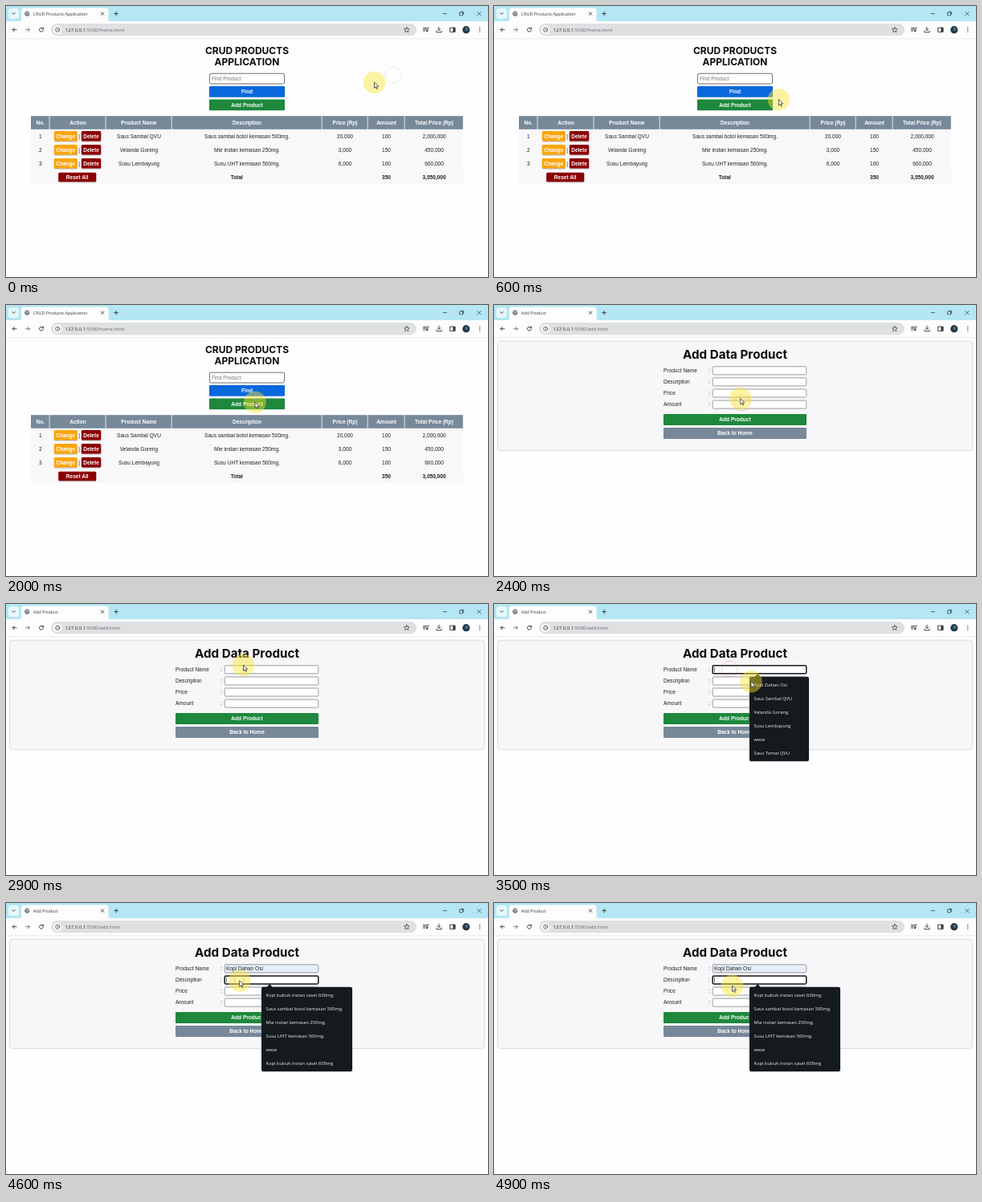
Animation, 600 px wide and 338 px high, one loop 5000 ms. Source, as an HTML page:

```html
<!DOCTYPE html>
<html lang="en">
<head>
<meta charset="utf-8">
<title>CRUD Products Application</title>
<style>
  html, body { margin: 0; width: 100%; height: 100%; overflow: hidden; background: #fefdff; }
  svg { display: block; width: 100%; height: 100%; }
  text { font: 6.55px "Liberation Sans", Arial, sans-serif; fill: #222; white-space: pre; }
  .bold { font-weight: 700; }
  .white { fill: #fff; }
  .hint { font-size: 6.4px; fill: #777; }
  .title { font: 700 12px Inter, sans-serif; fill: #0c0c0c; }
  .big { font-size: 15.2px; }
  .ui { font: 5.4px "Open Sans", sans-serif; fill: #33383c; }
  .url { font-size: 6px; fill: #62666a; }
  .item { font-size: 5.75px; fill: #eceef0; }
  .icon { fill: none; stroke: #33373a; stroke-width: .9; stroke-linecap: round; stroke-linejoin: round; }
</style>
</head>
<body>
<svg id="stage" viewBox="0 0 600 338" preserveAspectRatio="none"></svg>
<script>
const NS = "http://www.w3.org/2000/svg";
const stage = document.getElementById("stage");
const LOOP = 5000, STEP = 100;
const GREEN = "#1e883c", SLATE = "#778899", ORANGE = "#fca50c", RED = "#8b0000";

function add(parent, tag, attrs = {}, content) {
  const el = document.createElementNS(NS, tag);
  for (const key in attrs) el.setAttribute(key, attrs[key]);
  if (content !== undefined) el.textContent = content;
  parent.appendChild(el);
  return el;
}
const set = (el, attrs) => { for (const key in attrs) el.setAttribute(key, attrs[key]); };
const show = (el, on) => el.setAttribute("visibility", on ? "visible" : "hidden");
const group = parent => add(parent, "g");
const rect = (p, x, y, width, height, fill, more = {}) =>
  add(p, "rect", { x, y, width, height, fill, ...more });
const circle = (p, cx, cy, r, fill, more = {}) => add(p, "circle", { cx, cy, r, fill, ...more });
const icon = (p, d, more = {}) => add(p, "path", { d, class: "icon", ...more });
const label = (p, x, y, str, cls = "") => add(p, "text", { x, y, class: cls }, str);
const centred = (p, x, y, str, cls = "") =>
  add(p, "text", { x, y, class: cls, "text-anchor": "middle" }, str);

function button(p, x, y, w, h, fill, str, raised) {
  if (raised) rect(p, x + .3, y + 1, w, h, "#000", { rx: 1.5, opacity: .25 });
  rect(p, x, y, w, h, fill, { rx: raised ? 1.5 : 1 });
  centred(p, x + w / 2, y + h / 2 + 2.3, str, "bold white");
}

function buildBrowser(p) {
  rect(p, 0, 0, 600, 20, "#b4e7f3");
  rect(p, 0, 19, 600, 22, "#fdfdfe");
  rect(p, 0, 40.5, 600, .7, "#dfe2e5");
  rect(p, 3, 3, 13, 13, "#e6f7fb", { rx: 3.5 });
  icon(p, "M7.8 8.6 L9.6 10.4 L11.4 8.6");
  add(p, "path", { d: "M15 19.5 Q19 19.5 19 16 V6 Q19 2.5 22.5 2.5 H124 Q127.500 2.500 127.500 6 V16 Q127.500 19.500 131 19.500 Z", fill: "#fdfdfe" });
  circle(p, 26.3, 9.6, 3.1, "#6b7075");
  add(p, "path", { d: "M24 8.500 Q26 7 26.500 9 T25.500 11.500 M27.500 7.500 L28.500 10", class: "icon", style: "stroke:#e9ecee;stroke-width:.8" });
  icon(p, "M118.4 7.900 l3.400 3.400 m0 -3.400 l-3.400 3.400");
  icon(p, "M134.700 9.600 h4.800 M137.100 7.200 v4.800");
  icon(p, "M544 9.600 h4.600", { style: "stroke-width:.7" });
  icon(p, "M565 8.200 h3.600 v3.600 h-3.600 z M566.200 7.200 h3.400 v3.400", { style: "stroke-width:.7" });
  icon(p, "M586.800 7.400 l4.400 4.400 m0 -4.400 l-4.400 4.400", { style: "stroke-width:.7" });

  icon(p, "M13 29.600 H8.200 M10.400 27.300 L8.100 29.600 L10.400 31.900");
  icon(p, "M24.600 29.600 H29.400 M27.200 27.300 L29.500 29.600 L27.200 31.900", { opacity: .65 });
  icon(p, "M46 28.100 A2.500 2.500 0 1 0 46.500 30.200 M46.600 26.900 V28.700 H44.800");
  rect(p, 56, 22, 455, 15.3, "#dfe0e2", { rx: 7.6 });
  circle(p, 64.2, 29.7, 5.4, "#f8f9fa");
  circle(p, 64.2, 29.7, 2.6, "none", { class: "icon", style: "stroke-width:.7" });
  icon(p, "M64.200 29.500 v1.200 M64.200 28.200 v.1", { style: "stroke-width:.7" });
  const star = Array.from({ length: 10 }, (_, i) => {
    const a = -Math.PI / 2 + i * Math.PI / 5, r = i % 2 ? 1.6 : 3.5;
    return (498.8 + r * Math.cos(a)).toFixed(2) + "," + (29.8 + r * Math.sin(a)).toFixed(2);
  });
  add(p, "polygon", { points: star.join(" "), class: "icon", style: "stroke-width:.7" });
  icon(p, "M519.500 27.500 h4 M519.500 29.300 h4 M519.500 31.100 h2 M524.900 31 V27 h1.300");
  circle(p, 524.1, 31.2, 1.1, "#33373a");
  icon(p, "M539 26.200 v4 M537.200 28.600 L539 30.400 L540.800 28.600 M535.900 31 v1.800 h6.200 v-1.800");
  icon(p, "M553 27 h6 v5.400 h-6 z");
  rect(p, 556.4, 27, 2.8, 5.4, "#33373a");
  circle(p, 572.8, 29.7, 4.6, "#243746");
  circle(p, 573.3, 29, 2, "#47758a");
  for (const y of [27.3, 29.7, 32.1]) circle(p, 589.8, y, .7, "#33373a");

  const tab = label(p, 33.8, 11.6, "", "ui");
  const url = add(p, "text", { x: 73.8, y: 31.8, class: "ui url" });
  add(url, "tspan", { style: "fill:#26292c" }, "127.0.0.1");
  const path = add(url, "tspan", {}, "");
  return { tab, path };
}

function buildHome(p) {
  centred(p, 300, 60.4, "CRUD PRODUCTS", "title");
  centred(p, 300, 74.4, "APPLICATION", "title");
  rect(p, 253.4, 84.2, 93.2, 12.8, "#fff", { rx: 1.8, stroke: "#4b4b50", "stroke-width": .8 });
  label(p, 256, 92.8, "Find Product", "hint");
  button(p, 253, 100, 94, 13.8, "#0868dc", "Find");
  button(p, 253, 116.4, 94, 13.8, GREEN, "Add Product");

  const edges = [31, 54.5, 124.5, 206.5, 393.5, 450.5, 496.5, 569.6];
  const heads = ["No.", "Action", "Product Name", "Description", "Price (Rp)", "Amount", "Total Price (Rp)"];
  const mid = i => (edges[i] + edges[i + 1]) / 2;
  heads.forEach((str, i) => {
    rect(p, edges[i], 137.2, edges[i + 1] - edges[i] - .8, 16.6, SLATE);
    centred(p, mid(i), 147.8, str, "bold white");
  });
  const rows = [
    ["Saus Sambal QVU", "Saus sambal botol kemasan 500mg.", "20,000", "100", "2,000,000"],
    ["Velanda Goreng", "Mie instan kemasan 250mg.", "3,000", "150", "450,000"],
    ["Susu Lembayung", "Susu UHT kemasan 500mg.", "6,000", "100", "600,000"]
  ];
  rows.forEach((row, n) => {
    const y = 154.5 + n * 17;
    for (let i = 0; i < 7; i++) rect(p, edges[i], y, edges[i + 1] - edges[i] - .8, 16.3, "#f8f7f9");
    centred(p, mid(0), y + 10.2, n + 1);
    button(p, 59.8, y + 1.6, 28.8, 12.4, ORANGE, "Change", true);
    centred(p, 91.2, y + 10.2, "|");
    button(p, 93.8, y + 1.6, 24.4, 12.4, RED, "Delete", true);
    row.forEach((str, i) => centred(p, mid(i + 2), y + 10.2, str));
  });
  rect(p, 31, 205.5, 538.8, 16.3, "#f8f7f9");
  button(p, 65.2, 207.8, 47, 11.4, RED, "Reset All", true);
  [[287.3, "Total"], [473.5, "350"], [533, "3,050,000"]]
    .forEach(([x, str]) => centred(p, x, 215.7, str, "bold"));
}

function buildForm(p) {
  rect(p, 4.3, 45.2, 591.4, 136.4, "#f7f6f9", { rx: 4, stroke: "#d3d2d7", "stroke-width": .8 });
  centred(p, 300, 67.2, "Add Data Product", "title big");
  const fields = ["Product Name", "Description", "Price", "Amount"].map((str, i) => {
    const y = 76.8 + i * 14.1;
    label(p, 211, y + 7.3, str);
    label(p, 267, y + 7.3, ":");
    return rect(p, 272.2, y, 116.6, 10, "#fff", { rx: 1.4 });
  });
  button(p, 211, 135.9, 178, 14, GREEN, "Add Product");
  button(p, 211, 153, 178, 14, SLATE, "Back to Home");
  const value = label(p, 274, 84.1, COFFEE);
  const caret = rect(p, 274, 78.4, .6, 7, "#111");
  return { fields, value, caret };
}

function buildMenu(p, y, w, items) {
  const g = group(p);
  rect(g, 317.8, y + .8, w + .6, 105.6, "#000", { rx: 2.5, opacity: .16 });
  add(g, "path", { d: `M324.500 ${y + .2} L328.200 ${y - 3.800} L331.900 ${y + .2} Z`, fill: "#141a1d" });
  rect(g, 318, y, w, 105.2, "#141a1d", { rx: 2 });
  items.forEach((str, i) => label(g, 323.6, y + 12.3 + i * 16.9, str, "ui item"));
  return g;
}

const COFFEE = "Kopi Dahan Osi";
rect(stage, 0, 0, 600, 338, "#fefdff");
const home = group(stage), formPage = group(stage);
const bar = buildBrowser(stage);
buildHome(home);
const form = buildForm(formPage);
const nameMenu = buildMenu(stage, 90.8, 74, [COFFEE, "Saus Sambal QVU",
  "Velanda Goreng", "Susu Lembayung", "www", "Saus Tomat QVU"]);
const infoMenu = buildMenu(stage, 104.8, 113, ["Kopi bubuk instan saset 600mg.",
  "Saus sambal botol kemasan 500mg.", "Mie instan kemasan 250mg.",
  "Susu UHT kemasan 500mg.", "www", "Kopi bubuk instan saset 600mg"]);

// Clicks: time, x, y
const clicks = [[-300, 482, 86], [2100, 309, 122], [3200, 293.5, 81], [3900, 345, 102], [4500, 290, 96]]
  .map(([at, x, y]) => ({ at, ring: circle(stage, x, y, 5, "none", { "stroke-width": .9 }) }));
const pointer = group(stage);
circle(pointer, 0, .3, 13.8, "#f9e62e", { opacity: .45 });
add(pointer, "path", {
  d: "M0 0 V7.400 L1.700 5.900 L2.900 8.500 L4.100 8 L2.900 5.400 H5.200 Z",
  fill: "#fff", stroke: "#222", "stroke-width": .7, "stroke-linejoin": "round"
});

// Pointer path: time, x, y
const route = [
  [0, 458.5, 95], [900, 318, 124], [1200, 313, 123], [1400, 328, 129], [1700, 292, 123],
  [2000, 310, 121], [2300, 308, 121], [2800, 296, 77], [2900, 295.5, 76], [3100, 293.5, 81],
  [3250, 293.5, 81], [3500, 320, 96.500], [3800, 345, 102], [3950, 345, 102], [4200, 298.5, 103],
  [4400, 290, 96], [4550, 290, 96], [4800, 296.5, 103], [5000, 296.5, 103]
];
function pointerAt(t) {
  const i = Math.max(1, route.findIndex(stop => stop[0] >= t));
  const [t0, x0, y0] = route[i - 1], [t1, x1, y1] = route[i];
  const u = (t - t0) / (t1 - t0), k = u * u * (3 - 2 * u);
  return [x0 + (x1 - x0) * k, y0 + (y1 - y0) * k];
}

function draw(t) {
  const onForm = t >= 2300;
  show(home, !onForm);
  show(formPage, onForm);
  bar.tab.textContent = onForm ? "Add Product" : "CRUD Products Application";
  bar.path.textContent = onForm ? ":5500/add.html" : ":5500/home.html";

  const focus = t < 3200 ? -1 : t < 4500 ? 0 : 1;
  const filled = onForm && t >= 3800;
  form.fields.forEach((field, i) => set(field, {
    fill: i === 0 && filled ? "#e6eefa" : "#fff",
    stroke: i === focus ? "#15171a" : "#85858a",
    "stroke-width": i === focus ? 1.5 : .8
  }));
  show(form.value, filled);
  show(form.caret, focus >= 0);
  const atEnd = focus === 0 && filled;
  set(form.caret, {
    x: atEnd ? 274.3 + form.value.getComputedTextLength() : 274,
    y: focus === 1 ? 92.4 : 78.4
  });

  show(nameMenu, t >= 3300 && t < 4300);
  const closing = t >= 4200;
  set(nameMenu, {
    opacity: closing ? .5 : 1,
    transform: closing ? "translate(355 143.500) scale(.965) translate(-355 -143.500)" : ""
  });
  show(infoMenu, t >= 4600);

  for (const { at, ring } of clicks) {
    const age = (t - at) / 600;
    show(ring, age >= 0 && age < 1);
    set(ring, {
      r: 4 + 12 * Math.max(0, age),
      stroke: at < 0 ? "#bbb" : "#d9534f",
      opacity: Math.max(0, .6 * (1 - age))
    });
  }
  pointer.setAttribute("transform", `translate(${pointerAt(t).join(" ")})`);
}

const start = performance.now();
function tick() {
  const t = (performance.now() - start) % LOOP;
  draw(Math.floor(t / STEP) * STEP);
  requestAnimationFrame(tick);
}
tick();
</script>
</body>
</html>
```
